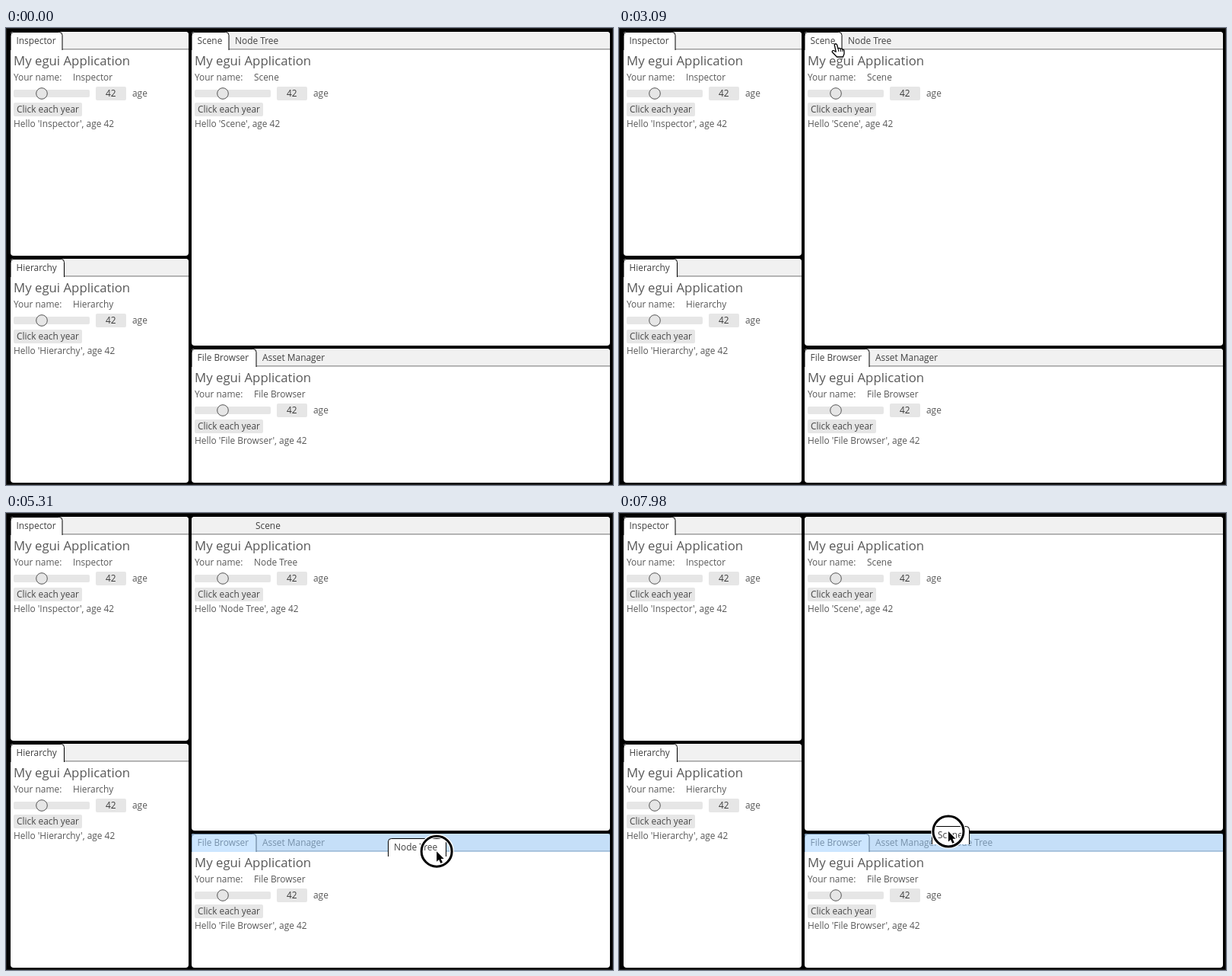
Write an HTML page with a canvas that moves like this. It is 798 px wide and 600 px high and loops after 8000 ms.

```html
<!DOCTYPE html>
<html lang="en">
<head>
<meta charset="utf-8">
<title>Dock layout</title>
<style>
html, body { margin: 0; width: 100%; height: 100%; overflow: hidden; background: #000; }
canvas { display: block; width: 798px; height: 600px; }
</style>
</head>
<body>
<canvas id="stage" width="798" height="600"></canvas>
<script>
const LOOP = 8000, STEP = 30, LAG = 35;
const FONT = '"Open Sans", "Noto Sans", sans-serif';
const BAR = '#f1f1f1', WIDGET = '#e6e6e6', BODY_TEXT = '#585858', TAB_TEXT = '#404040';
const ctx = document.getElementById('stage').getContext('2d');

const TAB_WIDTH = {
  'Inspector': 68, 'Hierarchy': 70.5, 'Scene': 49,
  'Node Tree': 76, 'File Browser': 85, 'Asset Manager': 97
};
const SCENE = { x: 244, y: 5, w: 550, h: 412 };
const FILES = { x: 244, y: 421, w: 550, h: 176 };
const INSPECTOR = { x: 6, y: 5, w: 234, h: 294 };
const HIERARCHY = { x: 6, y: 303, w: 234, h: 294 };

// Pointer path: time, x, y
const PATH = [
  [2610, 13, 0], [2820, 120, 34], [3090, 285, 21], [3240, 287, 26], [3390, 262, 20],
  [3420, 262, 20], [3540, 288, 27], [3690, 286, 20], [4230, 286, 20], [4650, 300, 62],
  [4860, 345, 200], [4980, 383, 348], [5100, 440, 412], [5250, 530, 440], [5400, 600, 445],
  [6060, 600, 445], [6210, 470, 470], [6360, 330, 456], [6510, 378, 443], [6900, 378, 443],
  [7200, 300, 200], [7500, 261, 20], [7680, 259, 18], [7770, 362, 175], [7870, 400, 360],
  [7930, 421, 419], [7980, 433, 418], [8000, 433, 418]
];

// Tab drags: button down, drag start, release, grab offset within the tab
const DRAGS = [
  { tab: 'Scene', press: 3330, start: 3420, end: 3870, dx: 18, dy: 15 },
  { tab: 'Node Tree', press: 4230, start: 4290, end: 5640, dx: 42, dy: 15 },
  { tab: 'Scene', press: 7590, start: 7710, end: LOOP + STEP, dx: 15, dy: 12 }
];

function slope(i, k) {
  const a = PATH[i - 1], b = PATH[i], c = PATH[i + 1];
  const rests = p => p[1] === b[1] && p[2] === b[2];
  if (!a || !c || rests(a) || rests(c)) return 0;
  return (c[k] - a[k]) / (c[0] - a[0]);
}

function pointerAt(t) {
  if (t <= PATH[0][0]) return { x: PATH[0][1], y: PATH[0][2] };
  let i = 0;
  while (i < PATH.length - 2 && t >= PATH[i + 1][0]) i++;
  const a = PATH[i], b = PATH[i + 1], d = b[0] - a[0];
  const u = Math.min(1, (t - a[0]) / d), u2 = u * u, u3 = u2 * u;
  const axis = k => (2 * u3 - 3 * u2 + 1) * a[k] + (u3 - 2 * u2 + u) * d * slope(i, k)
    + (3 * u2 - 2 * u3) * b[k] + (u3 - u2) * d * slope(i + 1, k);
  return { x: axis(1), y: axis(2) };
}

function text(str, x, y, size = 11.9, color = BODY_TEXT) {
  ctx.font = `${size}px ${FONT}`;
  ctx.fillStyle = color;
  ctx.fillText(str, x, y);
}

function box(x, y, w, h, color, radius = 2) {
  ctx.fillStyle = color;
  ctx.beginPath();
  ctx.roundRect(x, y, w, h, radius);
  ctx.fill();
}

function tabShape(name, x, y) {
  const w = TAB_WIDTH[name], h = 24, r = 4;
  ctx.beginPath();
  ctx.moveTo(x + 0.5, y + h);
  ctx.lineTo(x + 0.5, y + r);
  ctx.arcTo(x + 0.5, y + 0.5, x + r, y + 0.5, r);
  ctx.lineTo(x + w - r, y + 0.5);
  ctx.arcTo(x + w + 0.5, y + 0.5, x + w + 0.5, y + r, r);
  ctx.lineTo(x + w + 0.5, y + h);
  ctx.fillStyle = '#fff';
  ctx.fill();
  ctx.strokeStyle = '#000';
  ctx.lineWidth = 1;
  ctx.stroke();
  text(name, x + 8, y + 16, 11.9, TAB_TEXT);
}

function form(name, x, y) {
  text('My egui Application', x, y + 44, 16.8);
  text('Your name:', x, y + 64);
  text(name, x + 78, y + 64);
  box(x, y + 76, 100, 10, WIDGET);
  ctx.beginPath();
  ctx.arc(x + 37, y + 81, 7.3, 0, Math.PI * 2);
  ctx.fillStyle = WIDGET;
  ctx.fill();
  ctx.strokeStyle = '#555';
  ctx.lineWidth = 1;
  ctx.stroke();
  box(x + 108, y + 72, 40, 18, WIDGET);
  text('42', x + 121, y + 85, 11.9, '#3c3c3c');
  text('age', x + 156, y + 85);
  box(x, y + 93, 90, 18, WIDGET);
  text('Click each year', x + 4, y + 106, 11.9, '#484848');
  text(`Hello '${name}', age 42`, x, y + 125);
}

function panel(rect, tabs, active, dragged) {
  const { x, y, w, h } = rect;
  box(x, y, w, h, '#fff', 4);
  box(x, y, w, 24, BAR, [4, 4, 0, 0]);
  ctx.fillStyle = '#a2a2a2';
  ctx.fillRect(x, y + 22, w, 1.5);
  let left = x;
  for (const name of tabs) {
    if (name !== dragged) {
      if (name === active) {
        ctx.save();
        ctx.beginPath();
        ctx.rect(x, y, w, 24);
        ctx.clip();
        tabShape(name, left - 0.5, y);
        ctx.restore();
      } else {
        text(name, left + 8, y + 16, 11.9, TAB_TEXT);
      }
    }
    left += TAB_WIDTH[name];
  }
  form(active, x + 4, y);
}

const inside = (p, r) => p.x >= r.x && p.x <= r.x + r.w && p.y >= r.y && p.y <= r.y + r.h;

// The drop area belongs to the nearest of the five anchor points of a panel.
function dropArea(p) {
  const r = [SCENE, FILES, INSPECTOR, HIERARCHY].find(q => inside(p, q));
  if (!r) return null;
  const { x, y, w, h } = r;
  if (p.y < y + 24) return [x, y, w, 24];
  const options = [
    [0.5, 0.5, [x, y, w, h]],
    [0, 0.5, [x, y, w / 2, h]],
    [1, 0.5, [x + w / 2, y, w / 2, h]],
    [0.5, 0, [x, y, w, h / 2]],
    [0.5, 1, [x, y + h / 2, w, h / 2]]
  ];
  const dist = o => Math.hypot(p.x - x - o[0] * w, p.y - y - o[1] * h);
  return options.reduce((a, b) => dist(b) < dist(a) ? b : a)[2];
}

function ring(p) {
  ctx.beginPath();
  ctx.arc(p.x, p.y, 20, 0, Math.PI * 2);
  ctx.strokeStyle = '#fff';
  ctx.lineWidth = 5.5;
  ctx.stroke();
  ctx.strokeStyle = '#000';
  ctx.lineWidth = 3;
  ctx.stroke();
}

const ARROW = new Path2D('M0 0V13.5L3 10.8L5.3 15.8L7.8 14.7L5.5 9.8H9.6Z');
const HAND = new Path2D('M-1.8 1Q0-1.5 1.6 1L3 6Q5 4.6 6 6.4Q8 5.4 8.8 7.3Q10.8 6.8 11 9'
  + 'L11 13L9.5 17H1.5L-4.8 10.5Q-4.8 8 -2.5 8.7L0.2 10.2Z');
const KNUCKLES = new Path2D('M3 6L4 10M6 6.4L6.6 10M8.8 7.3L9 10');

function cursor(p, hand) {
  ctx.save();
  ctx.translate(p.x, p.y);
  ctx.lineJoin = 'round';
  if (hand) {
    ctx.fillStyle = '#fff';
    ctx.strokeStyle = '#000';
    ctx.lineWidth = 1.3;
    ctx.fill(HAND);
    ctx.stroke(HAND);
    ctx.lineWidth = 1;
    ctx.stroke(KNUCKLES);
  } else {
    ctx.strokeStyle = '#fff';
    ctx.lineWidth = 2.4;
    ctx.stroke(ARROW);
    ctx.fillStyle = '#000';
    ctx.fill(ARROW);
  }
  ctx.restore();
}

function bannerAlpha(t) {
  if (t < 900 || t >= 2610) return 0;
  if (t < 1110) return 0.8 * (t - 870) / 240;
  if (t < 1410) return 0.8;
  return Math.max(0.055, 0.8 - 0.745 * (t - 1380) / 240);
}

function banner(alpha) {
  ctx.fillStyle = `rgba(0,0,0,${alpha})`;
  ctx.fillRect(0, 558, 798, 42);
  ctx.fillStyle = '#fff';
  ctx.fillRect(358, 582, 2, 2);
}

function draw(t) {
  const drag = DRAGS.find(d => t >= d.start && t < d.end);
  const dragged = drag && drag.tab;
  const sceneTabs = t < 3870 ? ['Scene', 'Node Tree'] : t < 5640 ? ['Node Tree', 'Scene'] : ['Scene'];
  const fileTabs = ['File Browser', 'Asset Manager'];
  if (t >= 5640) fileTabs.push('Node Tree');

  ctx.fillStyle = '#000';
  ctx.fillRect(0, 0, 798, 600);
  ctx.strokeStyle = '#222';
  ctx.lineWidth = 1;
  ctx.strokeRect(0.5, 0.5, 797, 599);

  panel(INSPECTOR, ['Inspector'], 'Inspector');
  panel(HIERARCHY, ['Hierarchy'], 'Hierarchy');
  panel(SCENE, sceneTabs, sceneTabs[0], dragged);
  panel(FILES, fileTabs, 'File Browser', dragged);

  const alpha = bannerAlpha(t);
  if (alpha) banner(alpha);
  if (t < 2610) return;

  const p = pointerAt(t);
  if (drag) {
    const late = pointerAt(Math.max(drag.start, t - LAG));
    const area = dropArea(late);
    if (area) {
      ctx.fillStyle = 'rgba(162,210,255,0.55)';
      ctx.fillRect(...area);
    }
    tabShape(drag.tab, Math.round(late.x - drag.dx), Math.round(late.y - drag.dy));
  }
  if (DRAGS.some(d => t >= d.press && t < d.end + STEP)) ring(p);
  const overTab = (p.y < 30 && (p.x < 74 || (p.x > 244 && p.x < 360)))
    || (p.y > 421 && p.y < 448 && p.x > 244 && p.x < 500);
  cursor(p, overTab && !drag);
}

function frame(now) {
  const t = now % LOOP;
  draw(Math.floor(t / STEP) * STEP);
  requestAnimationFrame(frame);
}
requestAnimationFrame(frame);
</script>
</body>
</html>
```
